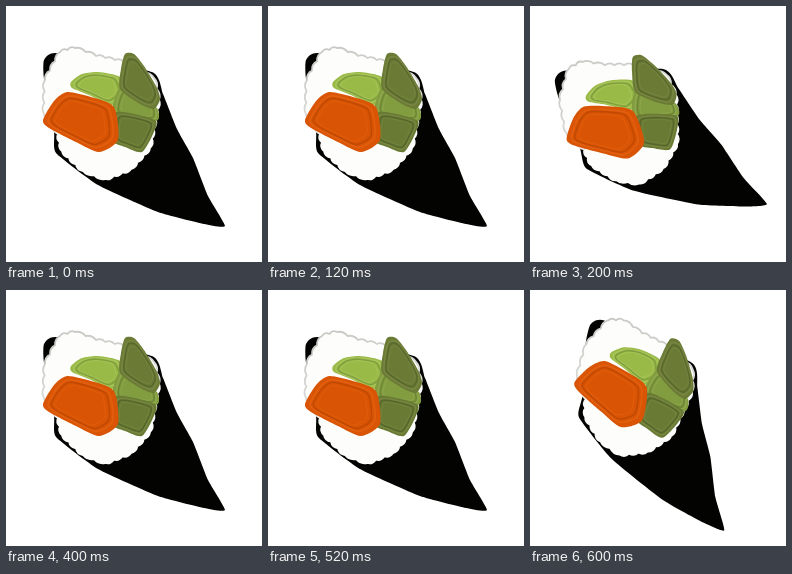
An HTML page for the animation above (0.8 s loop, 256 px wide and 256 px high).

```html
<!DOCTYPE html>
<html lang="en">
<head>
<meta charset="utf-8">
<title>Hand roll</title>
<style>
  html, body { margin: 0; width: 100%; height: 100%; overflow: hidden; background: #fff; }
  svg { display: block; width: 100vw; height: 100vh; }
  path { stroke-linejoin: round; }
</style>
</head>
<body>
<svg viewBox="0 0 256 256">
  <defs>
    <linearGradient id="rim" x1="0" y1="0" x2="0.3" y2="1">
      <stop offset="0" stop-color="#c6c6c3"/>
      <stop offset="0.5" stop-color="#d8d8d5"/>
      <stop offset="0.7" stop-color="#fdfdfb"/>
    </linearGradient>
  </defs>
  <g id="roll"></g>
</svg>
<script>
const roll = document.getElementById('roll');

function add(d, attrs) {
  const el = document.createElementNS('http://www.w3.org/2000/svg', 'path');
  el.setAttribute('d', d);
  for (const key in attrs) el.setAttribute(key, attrs[key]);
  roll.append(el);
}

const parse = text => text.split(' ').map(p => p.split(',').map(Number));

// Closed outline through the points; k sets how soft the corners are
function curve(pts, k) {
  const n = pts.length;
  const at = i => pts[(i + n) % n];
  const parts = pts.map((b, i) => {
    const a = at(i - 1), c = at(i + 1), e = at(i + 2);
    const p = b.map((v, j) => v + (c[j] - a[j]) * k);
    const q = c.map((v, j) => v - (e[j] - b[j]) * k);
    return `C${p} ${q} ${c}`;
  });
  return `M${pts[0]}${parts.join('')}Z`;
}

// Clockwise outline whose edges are broken into outward bumps
function scallop(pts, size, height) {
  let d = 'M' + pts[0];
  pts.forEach(([x, y], i) => {
    const [x2, y2] = pts[(i + 1) % pts.length];
    const len = Math.hypot(x2 - x, y2 - y);
    const count = Math.round(len / size);
    const at = (t, out) => [
      x + (x2 - x) * t + (y2 - y) / len * out,
      y + (y2 - y) * t - (x2 - x) / len * out
    ];
    for (let s = 0; s < count; s++) {
      d += `Q${at((s + 0.5) / count, height)} ${at((s + 1) / count, 0)}`;
    }
  });
  return d + 'Z';
}

function shrink(pts, scale) {
  const mid = [0, 1].map(j => pts.reduce((sum, p) => sum + p[j], 0) / pts.length);
  return pts.map(p => p.map((v, j) => mid[j] + (v - mid[j]) * scale));
}

// A filling with a raised, brushed rim
function filling(text, base, dark, light) {
  const pts = parse(text);
  add(curve(pts, 0.12), { fill: base });
  const rim = (scale, stroke, width, opacity) =>
    add(curve(shrink(pts, scale), 0.12), { fill: 'none', stroke, 'stroke-width': width, opacity });
  rim(0.86, light, 1.6, 0.5);
  rim(0.77, dark, 1.6, 0.7);
  rim(0.66, light, 1, 0.4);
}

// Seaweed cone
add(curve(parse('38,54 51,47 146,66 157,88 171,123 187,152 202,190 219,220 198,218 152,206 92,179 50,147 48,126 38,73'), 0.08),
  { fill: '#030302' });

// Rice
add(scallop(parse('54,46 69,42 90,50 118,56 148,72 153,94 144,142 125,163 99,173 77,165 56,145 52,128 38,108 39,74'), 10, 3.5),
  { fill: '#fdfdfb', stroke: 'url(#rim)', 'stroke-width': 1.8 });

// Avocado, cucumber, salmon
filling('65,76 76,68 92,66 114,71 120,88 106,99 83,89 66,82', '#9aba48', '#76943a', '#b6cf69');
filling('114,82 135,96 151,102 150,115 108,108', '#829d40', '#667e30', '#9bb257');
filling('119,48 128,48 138,60 150,80 154,93 148,103 134,98 114,83 115,63', '#6b7b36', '#526229', '#848f4c');
filling('109,107 129,108 150,115 147,128 136,146 119,141 106,134', '#697a34', '#50602a', '#839149');
filling('37,114 48,95 61,86 85,91 108,101 112,134 93,146 70,136 43,122', '#d95505', '#b84500', '#ea6a18');

// Rocks left, back, right, back, holding each pose
const poses = [
  { turn: 0, x: 0, y: 0 },
  { turn: -12.2, x: 0.5, y: -0.6 },
  { turn: 0, x: 0, y: 0 },
  { turn: 14.5, x: 1.2, y: 0.4 }
];
const hold = 200;

function draw(ms) {
  const { turn, x, y } = poses[Math.floor(ms / hold) % poses.length];
  roll.setAttribute('transform', `translate(${x} ${y}) rotate(${turn} 128 128)`);
}

const start = performance.now();
function tick() {
  draw(performance.now() - start);
  requestAnimationFrame(tick);
}
tick();
</script>
</body>
</html>
```
